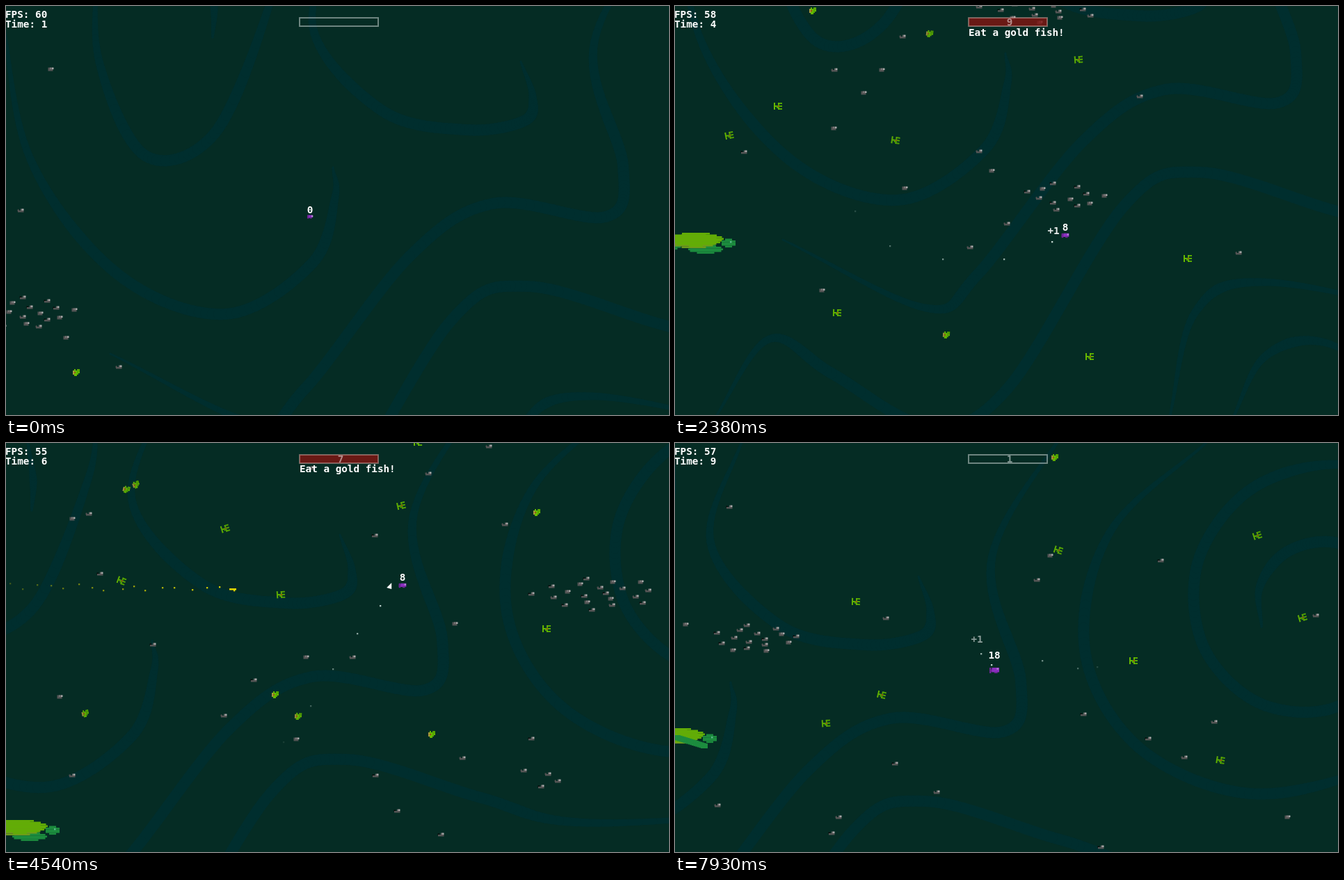
An HTML page with a canvas that plays this animation: 953 px wide and 588 px high, repeating every 7990 ms.

```html
<!DOCTYPE html>
<html lang="en">
<head>
<meta charset="utf-8">
<title>Fish game</title>
<style>
  html, body { margin: 0; width: 100%; height: 100%; overflow: hidden; background: #052c24; }
  canvas { display: block; }
</style>
</head>
<body>
<canvas id="stage" width="953" height="588"></canvas>
<script>
const LOOP = 7990;
const g = document.getElementById('stage').getContext('2d');

// [time, x, y]
const CAMERA = [[0, 0, 2], [830, 118, -70], [1590, 110, -150], [2490, -12, -160], [3180, -143, -124],
  [4540, -260, 54], [5580, -496, 137], [7050, -498, 75], [7930, -390, 114]];
const PLAYER = [[0, 437, 301], [900, 242, 430], [1250, 267, 468], [1590, 347, 527], [2400, 560, 490],
  [3180, 652, 370], [4540, 830, 151], [5400, 1001, 156], [5580, 1047, 154], [7050, 961, 213],
  [7560, 824, 182], [7930, 849, 213]];
const QUEST_START = 950, QUEST_END = 5400;

// Key points of the sea currents, x and y in turn.
const CURRENTS = [
  [297,45, 299,0, 290,-60],
  [130,-60, 134,80, 200,215, 300,183, 378,0, 390,-90],
  [-8,0, 35,220, 160,385, 315,443, 440,370, 473,275, 470,232],
  [490,-125, 441,30, 540,150, 660,178, 745,165, 757,130, 740,80],
  [970,-160, 846,50, 887,230, 862,303, 700,284, 580,360, 430,550, 355,598, 150,500],
  [1451,474, 1096,494, 943,458, 750,403, 640,452, 473,714, 360,768, 220,692, 130,643, 50,760],
  [705,760, 743,604, 843,561, 1110,610],
  [795,760, 843,668, 930,648, 1050,720],
  [1160,-118, 1016,15, 979,185, 1056,325, 1216,392, 1396,355, 1540,280]
];

const SLOW = .162, MID = .216, FAST = .27;
const range = n => [...Array(n).keys()];
const noise = n => { const v = Math.sin(n * 127.1 + 3.7) * 43758.5453; return v - Math.floor(v); };
const between = (n, low, high) => low + noise(n) * (high - low);

const shoal = (count, seed, x, y, rx, ry, speed, eaten = () => LOOP) => range(count).map(i => {
  const angle = i * 2.4, far = Math.sqrt((i + .5) / count);
  return {
    x: x + rx * far * Math.cos(angle) + between(seed + i, -6, 6),
    y: y + ry * far * Math.sin(angle), speed, gone: eaten(i)
  };
});

const smallFishes = [
  { x: 162, y: 517, speed: FAST, gone: LOOP },
  ...range(55).map(i => ({
    x: between(i, -1700, 100), y: between(i + 100, -60, 620),
    speed: [SLOW, MID, FAST][i % 3], gone: LOOP
  })),
  ...shoal(16, 300, 35, 440, 65, 24, MID, i => i % 5 ? between(i + 320, 700, 4200) : LOOP),
  ...shoal(20, 400, -120, 162, 95, 24, FAST),
  ...shoal(16, 500, -1636, 168, 68, 21, FAST)
];

const hunters = [
  { x: 101, y: 525, speed: .265, sway: 0 },
  ...range(28).map(i => ({
    x: between(i + 600, -1700, -20), y: between(i + 700, -110, 690),
    speed: between(i + 800, .2, .32), sway: between(i + 900, -12, 12)
  }))
];

// Meals as { when, score, gain }
const run = (from, gap, count) => range(count).map(i => [from + i * gap, 1]);
let total = 0;
const meals = [...run(206, 174, 7), [2300, 1], [QUEST_END, 5], ...run(5800, 130, 4), [7560, 1]]
  .map(([when, gain]) => ({ when, gain, score: total += gain }));

// Smooth path through timed points.
function glide(keys, t) {
  const last = keys.length - 1;
  let i = 0;
  while (i < last - 1 && t >= keys[i + 1][0]) i++;
  const a = keys[i], b = keys[i + 1], span = b[0] - a[0], p = Math.min(1, (t - a[0]) / span);
  const slope = (n, c) => {
    const l = keys[Math.max(0, n - 1)], r = keys[Math.min(last, n + 1)];
    return (r[c] - l[c]) / (r[0] - l[0]) * span;
  };
  return [1, 2].map(c => {
    const q = p * p, k = q * p;
    return (2 * k - 3 * q + 1) * a[c] + (k - 2 * q + p) * slope(i, c)
      + (3 * q - 2 * k) * b[c] + (k - q) * slope(i + 1, c);
  });
}

function box(color, x, y, w, h) {
  g.fillStyle = color;
  g.fillRect(x, y, w, h);
}

function text(str, x, y, align = 'left', color = '#fff') {
  g.font = 'bold 14.3px "DejaVu Sans Mono", monospace';
  g.textAlign = align;
  g.fillStyle = color;
  g.fillText(str, x, y);
}

const ORIGIN = [600, 300];
const sea = makeSea();

function makeSea() {
  const c = document.createElement('canvas');
  c.width = 2400;
  c.height = 1250;
  const s = c.getContext('2d');
  s.fillStyle = '#052c24';
  s.fillRect(0, 0, c.width, c.height);
  s.translate(...ORIGIN);
  s.strokeStyle = '#002e2e';
  s.lineCap = 'round';

  // Thin at both ends, full in the middle.
  const flow = keys => {
    const end = keys.length - 1, steps = end * 16;
    let from = glide(keys, 0);
    for (let i = 1; i <= steps; i++) {
      const to = glide(keys, i / 16), edge = Math.min(i, steps - i) / 16;
      s.lineWidth = Math.min(16, 3 + edge * 8);
      s.beginPath();
      s.moveTo(...from);
      s.lineTo(...to);
      s.stroke();
      from = to;
    }
  };
  for (const flat of CURRENTS) flow(range(flat.length / 2).map(i => [i, flat[2 * i], flat[2 * i + 1]]));
  flow(range(14).map(i => {
    const angle = 2.86 + i * .7, r = 80 * Math.exp(i * .083);
    return [i, 1310 + r * Math.cos(angle), 130 + r * Math.sin(angle)];
  }));
  return c;
}

function smallFish(x, y, n, t) {
  g.save();
  g.translate(Math.round(x), Math.round(y));
  const pose = Math.floor(t / 130 + noise(n) * 9) % 3;
  if (pose === 0) {
    box('#555', -3.5, -2.5, 7, 5);
    box('#777', -1, -2.5, 2.5, 2.5);
  } else {
    box(pose === 1 ? '#4c4c4c' : '#080a09', -4.5, -1.5, 2.5, 2.5);
    box('#555', -4, 0, 8.5, 2.5);
    box('#6c6c6c', 0, -2.5, 2.5, 2.5);
  }
  box('#aaa', 2, -2.5, 2.5, 2.5);
  g.restore();
}

const HUNTER_POSES = [
  ['a..abb', 'a..b..', 'aabrbb', 'a.bb..', 'a..abb'],
  ['.a.bb', 'taabb', 'traba', 'taab.', '.aa..']
];
const HUNTER_COLORS = { a: '#66b800', b: '#56a800', r: '#a34d16', t: '#a9983f' };

function hunter({ x, y, speed, sway }, n, t) {
  const rows = HUNTER_POSES[(Math.floor(t / 150) + n) % 4 ? 0 : 1];
  const phase = t / 900 + n;
  g.save();
  g.translate(Math.round(x + speed * t), Math.round(y + sway * Math.sin(phase)));
  g.rotate(sway / 30 * Math.cos(phase));
  rows.forEach((row, r) => [...row].forEach((c, k) => {
    if (c !== '.') box(HUNTER_COLORS[c], (k - row.length / 2) * 2, (r - 2.5) * 2, 2, 2);
  }));
  g.restore();
}

// Ellipse built from rows of coarse pixels.
function blob(color, cx, cy, rx, ry) {
  for (let y = -ry; y < ry; y += 2.5) {
    const half = Math.round(rx * Math.sqrt(Math.max(0, 1 - ((y + 1.25) / ry) ** 2)) / 2.5) * 2.5 || 2.5;
    box(color, cx - half, cy + y, half * 2, 2.6);
  }
}

function turtle(tip, y, folded) {
  const dark = '#1c8c3e', x = Math.round(tip);
  blob(dark, x - 91, y + 3, 12, 5);
  if (!folded) blob(dark, x - 43, y + 7.5, 25, 6);
  blob('#6f9c1c', x - 60, y - 4, 36, 10);
  blob('#62ad06', x - 57, y - 6.5, 39, 9.5);
  blob(dark, x - 10, y - 1.5, 10, 6);
  box('#58b78a', x - 8, y - 4, 2.5, 2.5);
  if (folded) range(16).forEach(i => box(dark, x - 62 + i * 2.6, y - 6 + i * .8, 10, 7));
}

function player(x, y, score, facing) {
  const w = 8 + score / 3, h = 5 + score / 6;
  g.save();
  g.translate(Math.round(x), Math.round(y));
  g.scale(facing, 1);
  box('#6c2494', -w / 2, -h / 2, 2.5, h);
  box('#6c2494', -w / 2, -1.5, w / 2, 3.5);
  box('#8b2fc0', -w / 4, -h / 2, w * .75, h - 1.5);
  box('#6c2494', 0, h / 2 - 2, w / 3, 2);
  box('#b58bd0', w / 4, -h / 2 + .5, 2.3, 2.3);
  g.restore();
}

const goldAt = t => [586 + (t - 4540) * .48, 156 + Math.min(1, (t - 4540) / 120)];
const playerAt = t => glide(PLAYER, t);

// Dots left behind by a moving thing.
function trail(where, t, from, to, every, life, spread, color) {
  for (let n = Math.ceil(Math.max(from, t - life) / every); n * every <= Math.min(t, to); n++) {
    const born = n * every, [x, y] = where(born);
    g.globalAlpha = 1 - (t - born) / life;
    box(color, Math.round(x + (noise(n) - .5) * spread), Math.round(y + (noise(n + 50) - .5) * spread), 2.3, 2.3);
  }
  g.globalAlpha = 1;
}

function hud(t) {
  const clock = 1.63 + t * .00105, quest = t >= QUEST_START && t < QUEST_END;
  text('FPS: ' + Math.round(57.6 + 2.4 * Math.cos(t / 470)), -1, 17);
  text('Time: ' + Math.floor(clock), -1, 31);
  if (quest) box('rgba(130,20,18,.8)', 422, 17, 113, 12);
  g.strokeStyle = quest ? 'rgba(210,165,160,.5)' : 'rgba(255,255,255,.42)';
  g.lineWidth = 2;
  g.strokeRect(422, 17, 113, 12);
  if (t < QUEST_START) return;
  const label = quest ? Math.min(10, Math.floor(13.6 - clock)) : 1;
  text(label, label < 10 ? 481 : 487, 28, 'center', 'rgba(255,255,255,.5)');
  if (quest) text('Eat a gold fish!', 422, 42 + Math.round(Math.sin(t / 160)));
}

function draw(t) {
  const cam = glide(CAMERA, t).map(Math.round);
  const [x, y] = playerAt(t), ahead = playerAt(t + 30)[0];
  const score = meals.filter(m => t >= m.when).pop()?.score ?? 0;

  g.setTransform(1, 0, 0, 1, 0, 0);
  g.drawImage(sea, cam[0] - ORIGIN[0], cam[1] - 2 - ORIGIN[1]);
  g.translate(cam[0], cam[1]);

  turtle(-199 + t * .118, 504, false);
  turtle(-486 + t * .118, 312, true);
  smallFishes.forEach((f, n) => {
    if (t < f.gone) smallFish(f.x + f.speed * t, f.y, n, t);
  });
  hunters.forEach((h, n) => hunter(h, n, t));

  trail(playerAt, t, 300, LOOP, 290, 1500, 16, '#c9dcd7');
  trail(goldAt, t, 3400, QUEST_END, 42, 900, 9, '#e3d900');
  if (t > 3400 && t < QUEST_END) {
    const [gx, gy] = goldAt(t).map(Math.round);
    box('#e3d900', gx - 5, gy - 1, 10, 2.5);
  }

  for (const { when, gain } of meals) {
    const age = t - when;
    if (age < 0 || age > 800) continue;
    const [mx, my] = playerAt(when);
    text('+' + gain, mx, my - 9, 'center', `rgba(255,255,255,${1 - age / 800})`);
  }

  if (t > 1400 && t < 1800) text('!', 304, 466, 'center', '#d31818');
  if (t > 4300 && t < 4800) {
    g.fillStyle = '#fff';
    g.beginPath();
    g.moveTo(x - 16, y - 4);
    g.lineTo(x - 16, y + 5);
    g.lineTo(x - 23, y + 3);
    g.fill();
  }
  player(x, y, score, ahead < x && t > 100 ? -1 : 1);
  text(score, Math.round(x), Math.round(y - 5 - score * score / 28), 'center');

  g.setTransform(1, 0, 0, 1, 0, 0);
  hud(t);
}

const start = performance.now();
function tick() {
  draw((performance.now() - start) % LOOP);
  requestAnimationFrame(tick);
}
tick();
</script>
</body>
</html>
```
